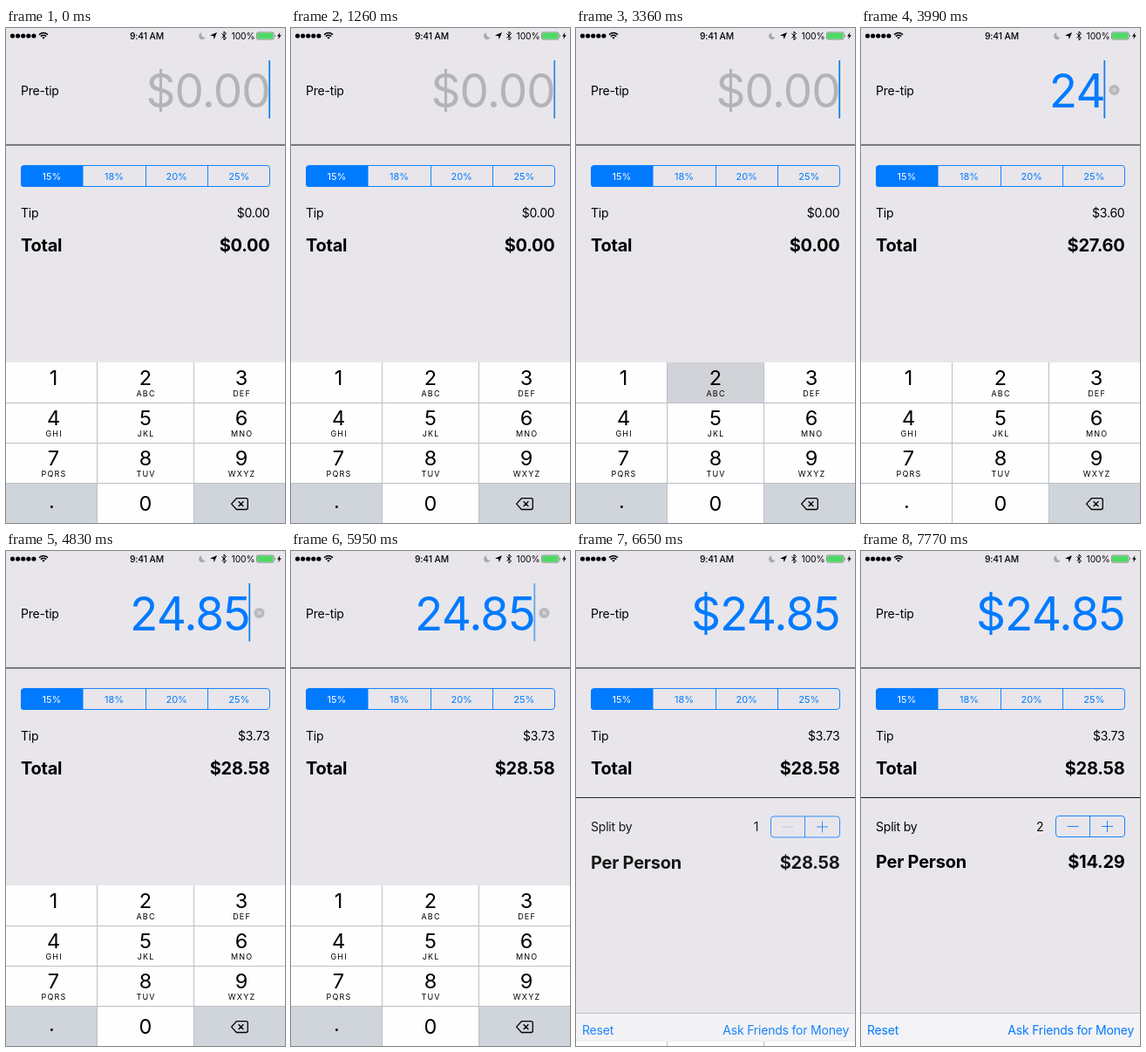
An HTML page that plays this animation: 320 by 567 pixels, repeating every 8000 ms.

```html
<!DOCTYPE html>
<html lang="en">
<head>
<meta charset="utf-8">
<title>Tip calculator</title>
<style>
  html, body { margin: 0; width: 100%; height: 100%; overflow: hidden; background: #e8e6eb; }
  svg { display: block; width: 100%; height: 100%; font-family: Inter, Roboto, sans-serif; }
  .body { font-size: 14px; letter-spacing: -.2px; }
  .bold { font-size: 20px; font-weight: 700; letter-spacing: -.25px; }
  .amount { font-size: 53px; font-weight: 400; letter-spacing: -.9px; }
  .status { font-size: 10.3px; letter-spacing: -.1px; }
  .clock { font-weight: 500; }
  .segment { font-size: 11px; }
  .digit { font-size: 23.5px; }
  .letters { font-size: 9px; letter-spacing: 1.2px; }
  .mid { text-anchor: middle; }
  .end { text-anchor: end; }
  .blue { fill: #007aff; }
  .outline { fill: none; stroke: #007aff; stroke-width: .9; }
</style>
</head>
<body>
<svg id="stage" viewBox="0 0 320 567"></svg>
<script>
const LOOP = 8000, ROW = 46, KEYS_TOP = 383, KEYS_HEIGHT = 184;
const KEY = '#fefefe', KEY_DARK = '#d0d5db', KEY_DOWN = '#d0d2d8';

// Key, time pressed, time released
const TAPS = [['2', 3360, 3500], ['4', 3710, 3850], ['.', 3990, 4130], ['8', 4480, 4620], ['5', 4690, 4830]];
const DISMISS = 6370, PLUS = 7420;

const text = (x, y, cls, str, id = '') => `<text id="${id}" x="${x}" y="${y}" class="${cls}">${str}</text>`;
const rect = (x, y, w, h, fill, more = '') => `<rect x="${x}" y="${y}" width="${w}" height="${h}" fill="${fill}" ${more}/>`;
const path = (d, more) => `<path d="${d}" ${more}/>`;

function statusBar() {
  const dots = [7.5, 13.6, 19.7, 25.8, 31.9].map(x => `<circle cx="${x}" cy="9" r="2.6"/>`).join('');
  const stroke = 'fill="none" stroke="#000"';
  return dots
    + path('M38 7.6Q43 3.4 48 7.6M39.8 9.6Q43 7 46.2 9.6', `${stroke} stroke-width="1.5"`)
    + path('M41.2 10.8Q43 9.6 44.8 10.8L43 12.8Z', '')
    + text(161.5, 12.7, 'status clock mid', '9:41 AM')
    + path('M224.3 5.2A4 4 0 1 0 228.6 11A4.3 4.3 0 0 1 224.3 5.2Z', 'fill="#aaa9ae"')
    + path('M242 5L238.6 13L238 9.2L234 8.6Z', '')
    + path('M247.4 6.4L252.6 11.4L250 13.8V4L252.6 6.4L247.4 11.4', `${stroke} stroke-width="1"`)
    + text(258.6, 12.7, 'status', '100%')
    + rect(287.5, 4.9, 19.6, 8.2, 'none', 'rx="1.6" stroke="#555" stroke-width=".6"')
    + rect(288.2, 5.6, 18.2, 6.8, '#4cd964', 'rx="1"')
    + path('M308 7.2Q309.6 9 308 10.8Z', 'fill="#555"')
    + path('M314.4 5L311 9.6H313.1L312.2 13L315.8 8.2H313.6Z', '');
}

function segments() {
  const labels = ['15%', '18%', '20%', '25%'];
  return path('M88.5 157.5H20.5A3.5 3.5 0 0 0 17 161V178.5A3.5 3.5 0 0 0 20.5 182H88.5Z', 'class="blue"')
    + `<rect x="17.5" y="157.5" width="285" height="24" rx="3.5" class="outline"/>`
    + path('M160.5 157.5V181.5M231.5 157.5V181.5', 'class="outline"')
    + labels.map((s, i) => `<g fill="${i ? '#007aff' : '#fff'}">${text(52.5 + i * 71.6, 174, 'segment mid', s)}</g>`).join('');
}

const isDark = key => key === '.' || key === '<';

function keyboard() {
  const letters = { 2: 'ABC', 3: 'DEF', 4: 'GHI', 5: 'JKL', 6: 'MNO', 7: 'PQRS', 8: 'TUV', 9: 'WXYZ' };
  const left = [0, 105, 216], width = [104, 110, 104], center = [54.5, 160, 270];
  let out = rect(0, KEYS_TOP, 320, KEYS_HEIGHT, '#bcbfc4');
  [...'123456789.0<'].forEach((key, i) => {
    const c = i % 3, row = Math.floor(i / 3), y = KEYS_TOP + row * ROW;
    out += rect(left[c], row ? y + 1 : y, width[c], row ? ROW - 1 : ROW, isDark(key) ? KEY_DARK : KEY, `data-key="${key}"`);
    if (key === '<') return;
    out += row < 3
      ? text(center[c], y + 26, 'digit mid', key) + text(center[c] + .6, y + 38.7, 'letters mid', letters[key] || '')
      : text(key === '.' ? 52.5 : 160, y + (key === '.' ? 29 : 31.7), 'digit mid', key);
  });
  return out + path('M264.4 538.7H275.2Q277.3 538.7 277.3 540.8V549.4Q277.3 551.5 275.2 551.5H264.4L258.6 545.1Z'
    + 'M266.6 542.2L272.4 548M272.4 542.2L266.6 548', 'fill="none" stroke="#000" stroke-width="1.3" stroke-linejoin="round"');
}

const splitRow = text(17, 321, 'body', 'Split by') + text(209.3, 321, 'body end', '', 'count')
  + rect(263, 304, 39.5, 23.5, '#007aff', 'id="flash"')
  + `<rect x="223.5" y="303.5" width="79" height="24" rx="3.5" class="outline"/>`
  + path('M262.5 303.5V327.5M276 315.5H289M282.5 309V322', 'class="outline"')
  + path('M236.5 315.5H249.5', 'id="minus" class="outline"');

const $ = id => document.getElementById(id);
$('stage').innerHTML = rect(0, 0, 320, 567, '#e8e6eb') + statusBar()
  + text(17, 77, 'body', 'Pre-tip') + text(0, 90.5, 'amount end', '', 'amount')
  + rect(0, 37, 1.8, 66.5, '#1480ea', 'id="cursor"')
  + `<g id="clear"><circle cx="290.5" cy="71" r="6" fill="#b8b7bc"/>`
  + path('M288.3 68.8L292.7 73.2M292.7 68.8L288.3 73.2', 'stroke="#f0eff2"') + '</g>'
  + rect(0, 133.5, 320, 1, '#111') + segments()
  + text(17, 216.5, 'body', 'Tip') + text(302.5, 216.5, 'body end', '', 'tip')
  + text(17, 256, 'bold', 'Total') + text(302.5, 256, 'bold end', '', 'total')
  + `<g id="extra">${rect(0, 282, 320, 1, '#111')}<g id="split">${splitRow}</g>`
  + `<g id="person">${text(17, 363, 'bold', 'Per Person')}${text(302.5, 363, 'bold end', '', 'share')}</g>`
  + rect(0, 529, 320, 38, '#f4f3f6') + rect(0, 529, 320, .8, '#b4b3b8')
  + text(7, 553.5, 'body blue', 'Reset') + text(313.2, 553.5, 'body blue end', 'Ask Friends for Money') + '</g>'
  + `<g id="keys">${keyboard()}</g>`;

const keyRects = [...document.querySelectorAll('[data-key]')];
const clamp = v => Math.max(0, Math.min(1, v));
const smooth = v => v * v * (3 - 2 * v);
const money = v => '$' + v.toFixed(2);
const set = (id, name, value) => $(id).setAttribute(name, value);
const put = (id, str) => { if ($(id).textContent !== str) $(id).textContent = str; };

// Caret fades out and in, and stays solid while keys are tapped
function caret(t) {
  if (t >= DISMISS) return 0;
  if (t >= 3300 && t < 5300) return 1;
  const p = (t - (t < 3300 ? 180 : 5300) + 1050) % 1050;
  return p < 510 ? 1 - clamp(p / 250) : clamp((p - 510) / 230);
}

function draw(t) {
  const typed = TAPS.filter(tap => t >= tap[2]).map(tap => tap[0]).join('');
  const editing = t < DISMISS, inset = typed && editing;
  const bill = Number(typed), tip = bill * .15, total = bill + tip;
  const people = t < PLUS ? 1 : 2;

  put('amount', !typed ? '$0.00' : editing ? typed : money(bill));
  set('amount', 'x', inset ? 279.8 : 302.9);
  set('amount', 'fill', typed ? '#007aff' : '#b4b3b8');
  set('cursor', 'x', inset ? 278.4 : 301.3);
  set('cursor', 'opacity', caret(t));
  set('clear', 'opacity', inset ? 1 : 0);
  put('tip', money(tip));
  put('total', money(total));

  for (const r of keyRects) {
    const key = r.dataset.key, dark = isDark(key);
    const down = TAPS.some(([k, a, b]) => k === key && t >= a && t < b);
    r.setAttribute('fill', dark ? (down ? KEY : KEY_DARK) : (down ? KEY_DOWN : KEY));
  }

  // Critically damped slide of the keyboard
  const w = Math.max(0, t - DISMISS) * .0194;
  set('keys', 'transform', `translate(0 ${KEYS_HEIGHT * (1 - (1 + w) * Math.exp(-w))})`);
  set('keys', 'visibility', t < 6930 ? 'visible' : 'hidden');

  const show = smooth(clamp((t - DISMISS) / 350));
  set('extra', 'opacity', show);
  set('split', 'transform', `translate(0 ${4.5 * (1 - show)})`);
  set('person', 'transform', `translate(0 ${9 * (1 - show)})`);
  put('count', String(people));
  put('share', money(total / people));
  set('minus', 'opacity', people > 1 ? 1 : .3);
  set('flash', 'opacity', t < PLUS ? 0 : .2 * (1 - clamp((t - PLUS - 100) / 110)));
}

const start = performance.now();
function tick() {
  draw((performance.now() - start) % LOOP);
  requestAnimationFrame(tick);
}
tick();
</script>
</body>
</html>
```
